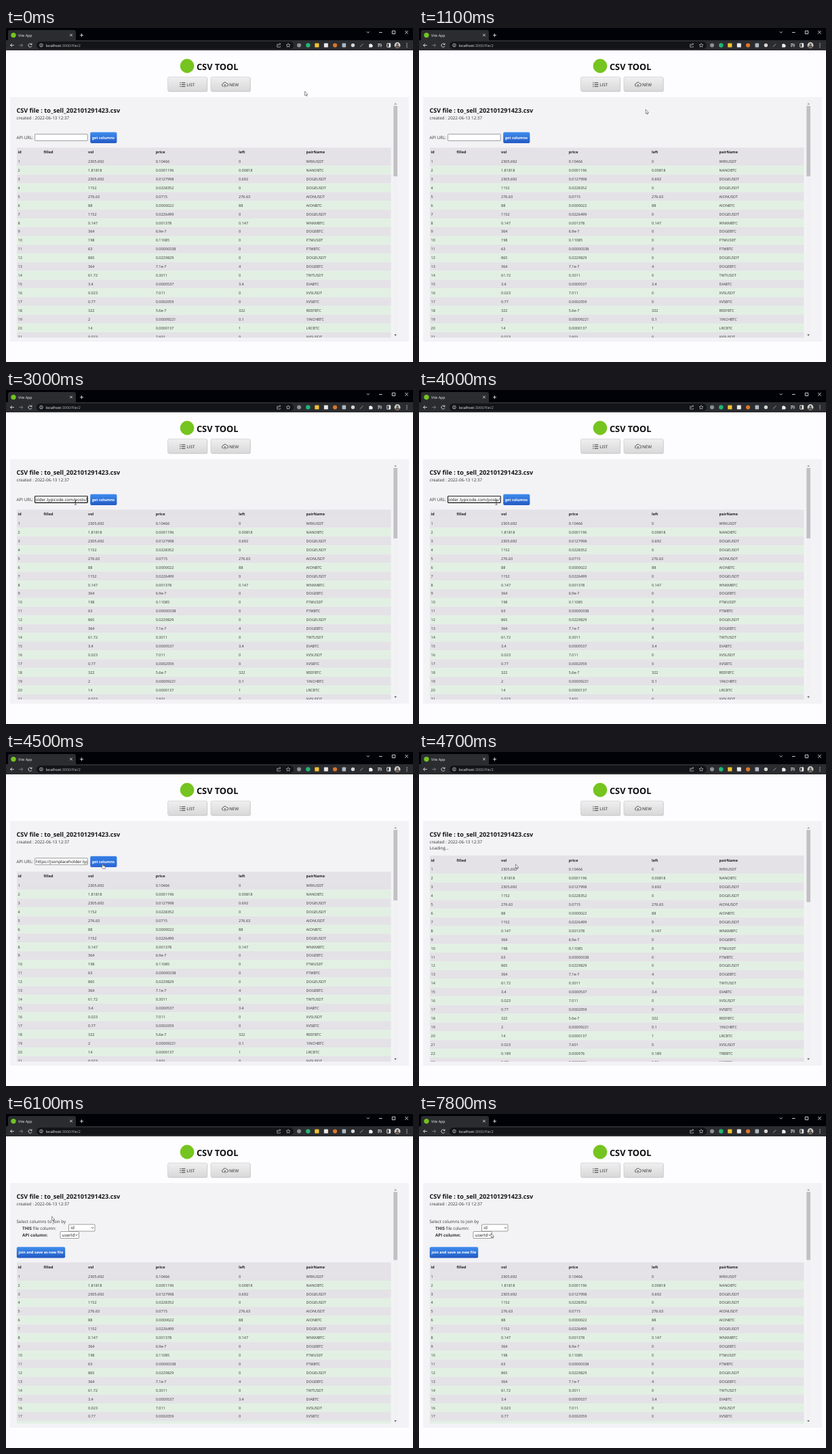
Animation of 600x493 px, one loop 8 s. Source, as an HTML page:

```html
<!DOCTYPE html>
<html lang="en">
<head>
<meta charset="utf-8">
<title>CSV tool</title>
<style>
  html, body { margin: 0; width: 100%; height: 100%; overflow: hidden; background: #fdfcfe; }
  svg { display: block; width: 600px; height: 493px; }
  text { font-family: "Open Sans", "Noto Sans", sans-serif; font-size: 6.3px; fill: #333; text-rendering: geometricPrecision; white-space: pre; }
  .b { font-weight: 700; }
  .cell { font-size: 5.5px; }
  .head { font-size: 5.5px; font-weight: 700; fill: #222; }
  .btn { font-size: 5.45px; font-weight: 700; fill: #fff; }
  .nav { font-size: 6.2px; font-weight: 600; fill: #555; }
  .line { fill: none; stroke: #dfe0e3; stroke-width: .9; }
  .dark { fill: none; stroke: #3c3c3c; stroke-width: 1; }
  .field { fill: #fff; stroke: #767676; stroke-width: .7; }
  .cursor { fill: #fff; stroke: #222; stroke-width: .5; }
</style>
</head>
<body>
<svg id="stage" viewBox="0 0 600 493" xmlns="http://www.w3.org/2000/svg"></svg>
<script>
const LOOP = 8000, STEP = 100, ROW = 12.925;
const URL_TEXT = 'https://jsonplaceholder.typicode.com/posts/';
const COLUMNS = { id: 17.5, filled: 55.5, vol: 121, price: 220.7, left: 343, pairName: 442.6 };
const ROWS = `2305.692 0.10466 0 WRXUSDT
1.81818 0.0001196 0.00818 NANOBTC
2305.692 0.0127998 0.692 DOGEUSDT
1152 0.0228352 0 DOGEUSDT
276.63 0.0715 276.63 AIONUSDT
88 0.0000022 88 AIONBTC
1152 0.0226499 0 DOGEUSDT
0.147 0.001378 0.147 WNXMBTC
364 6.9e-7 0 DOGEBTC
198 0.11085 0 FTMUSDT
63 0.00000338 0 FTMBTC
865 0.0229829 0 DOGEUSDT
364 7.1e-7 4 DOGEBTC
61.72 0.3011 0 TWTUSDT
3.4 0.0000537 3.4 DIABTC
0.023 7.011 0 XVSUSDT
0.77 0.0002059 0 XVSBTC
322 5.6e-7 322 REEFBTC
2 0.00009221 0.1 1INCHBTC
14 0.0000137 1 LRCBTC
0.023 7.601 0 XVSUSDT
0.189 0.000976 0.189 TRBBTC
0.77 0.0002031 0.01 XVSBTC`.split('\n').map(row => row.split(' '));

const rect = (x, y, w, h, fill, r = 0, extra = '') =>
  `<rect x="${x}" y="${y}" width="${w}" height="${h}" rx="${r}" fill="${fill}" ${extra}/>`;
const dot = (x, y, r, fill) => `<circle cx="${x}" cy="${y}" r="${r}" fill="${fill}"/>`;
const text = (x, y, value, cls = '', extra = '') => `<text x="${x}" y="${y}" class="${cls}" ${extra}>${value}</text>`;
const path = (d, cls = 'line', extra = '') => `<path d="${d}" class="${cls}" ${extra}/>`;
const gradient = (id, from, to) =>
  `<linearGradient id="${id}" x2="0" y2="1"><stop stop-color="${from}"/><stop offset="1" stop-color="${to}"/></linearGradient>`;
const clip = (id, x, y, w, h) => `<clipPath id="${id}">${rect(x, y, w, h, '#000')}</clipPath>`;

const defs = `<defs>
  ${gradient('grey', '#efefef', '#d8d8d8')}${gradient('blue', '#3f8dee', '#2259c4')}${gradient('hover', '#347fe6', '#2c66d4')}
  ${clip('scroll', 16, 107, 555, 350)}${clip('inside', 43, 156, 76.6, 11)}</defs>`;

function browser() {
  const bar = '#2b2c30';
  return rect(0, 0, 600, 33, '#000208') + rect(3, 3, 100, 17, bar, 3) + rect(0, 18, 600, 15, bar) +
    dot(11, 10.6, 3.7, '#73c322') +
    text(18, 12.6, 'Vite App', '', 'style="font-size:5.3px;fill:#f2f3f4"') +
    path('M94.2 8.7l3.6 3.6m0-3.6l-3.6 3.6M109 10.7h5m-2.5-2.5v5') +
    path('M531.8 5.3l1.9 1.9 1.9-1.9M550 6.5h4.6M569.3 4.2h4.4v4.4h-4.4zM588.2 4l4.6 4.6m0-4.6l-4.6 4.6') +
    rect(45, 20, 379, 11, '#131417', 5.5) +
    path('M11.8 25.5h-5.4m2.5-2.5l-2.5 2.5 2.5 2.5') +
    path('M19.3 25.5h5.4m-2.5-2.5l2.5 2.5-2.5 2.5', 'line', 'style="stroke:#7d7f84"') +
    path('M37.6 24a2.6 2.6 0 1 0 .4 2.5M38 22.5v2h-2') +
    `<circle cx="52" cy="25.5" r="2.4" class="line" style="stroke-width:.7"/>` + path('M52 25.2v1.6M52 23.9v.6') +
    text(58.5, 27.5, '<tspan fill="#fff">localhost</tspan>:3000/file/2', '', 'style="font-size:5.45px;fill:#b4b7bc"') +
    path('M401.5 24h-1.8v4.2h4.6v-1.5m-3-0.3c0-2 1-2.8 3.4-2.8m-1.5-1.3l1.6 1.3-1.6 1.4', 'line', 'style="stroke-width:.6"') +
    path('M416 22.6l.9 1.9 2.1.2-1.6 1.4.5 2.1-1.9-1.1-1.9 1.1.5-2.1-1.6-1.4 2.1-.2z', 'line', 'style="stroke-width:.6"') +
    dot(432, 25.5, 3, '#8d9095') + dot(445.3, 25.5, 3.2, '#20b576') +
    rect(455.2, 22.4, 6.2, 6.2, '#f1c232', .6) + rect(468.8, 22.5, 6, 6, '#e9e9e9', .6) +
    dot(485, 25.5, 3.1, '#df7625') + rect(495.5, 22.5, 5.6, 6, '#aeb8c4', .8) +
    dot(511.4, 25.5, 2.7, '#d5d5d5') + path('M522 27.8l4.3-4.4', 'line', 'style="stroke:#a8abb0"') +
    path('M535 24h1.5a1 1 0 0 1 2 0h1.4v1.4a1 1 0 0 1 0 2v1.1H535v-1.3a1 1 0 0 0 0-1.8z', '', 'fill="#eeeff0"') +
    path('M548 23.5h4.2M548 25.3h4.2M548 27.2h2.3M553.2 23.4v3.8h-1.4') +
    rect(561.7, 22.8, 5, 5.4, 'none', .4, 'stroke="#eee" stroke-width=".9"') + rect(564.4, 22.8, 2.3, 5.4, '#eee') +
    dot(577, 25.5, 4.4, '#cfd3d2') + dot(577, 24.2, 1.6, '#655850') +
    path('M573.8 28.4a3.2 2.8 0 0 1 6.4 0a4.4 4.4 0 0 1-6.4 0z', '', 'fill="#655850"') +
    [23, 25.5, 28].map(y => dot(591, y, .65, '#e4e5e8')).join('');
}

function navButton(x, label, labelX, icon) {
  return rect(x + .6, 72.9, 58, 21.3, '#cfcfd1', 2) +
    rect(x, 72.3, 58, 21.2, 'url(#grey)', 2, 'stroke="#c4c4c4" stroke-width=".6"') + icon + text(labelX, 85.8, label, 'nav');
}

function page() {
  const list = path('M258.7 80.9h5.6M258.7 83.6h5.6M258.7 86.3h5.6M256.2 80.9h1.3M256.2 83.6h1.3M256.2 86.3h1.3', 'dark');
  const cloud = path('M321 86h-.6a1.9 1.9 0 0 1-.2-3.8 2.6 2.6 0 0 1 4.9-.6 2.2 2.2 0 0 1 .3 4.4h-.8M322.8 87.3v-3.8m-1.3 1.3l1.3-1.3 1.3 1.3', 'dark', 'style="stroke-width:.8"');
  return rect(0, 33, 600, 460, '#fdfcfe') + dot(267, 56, 10.4, '#76c41f') +
    text(281, 62.1, 'CSV TOOL', 'b', 'style="font-size:12.75px;fill:#0c0c0c"') +
    navButton(238.5, 'LIST', 266.2, list) + navButton(302, 'NEW', 329, cloud) +
    rect(6, 102, 588, 361, '#f3f2f5') +
    text(15.4, 124.6, 'CSV file : to_sell_202101291423.csv', 'b', 'style="font-size:9.12px;fill:#141414"') +
    text(15.5, 134.9, 'created : 2022-06-13 12:37') +
    rect(571, 107, 6.3, 350, '#f1f0f2') + path('M572.3 112.9l1.8-2.2 1.8 2.2z', '', 'fill="#999"') +
    path('M572.3 452.2l1.8 2.2 1.8-2.2z', '', 'fill="#555"') + rect(571.3, 115, 5.7, 104, '#c1c0c3', 0, 'id="thumb"');
}

function table() {
  const xs = Object.values(COLUMNS);
  const head = rect(16, 0, 551.5, 14, '#e4e2e6') + Object.entries(COLUMNS).map(([name, x]) => text(x, 8.9, name, 'head')).join('');
  const body = ROWS.map((row, i) => {
    const y = 14 + i * ROW;
    return rect(16, y, 551.5, ROW, i % 2 ? '#e2f0e3' : '#e4e2e6') +
      [i + 1, '', ...row].map((value, c) => text(xs[c], y + 8.5, value, 'cell')).join('');
  }).join('');
  return `<g clip-path="url(#scroll)"><g id="table">${head}${body}</g></g>`;
}

function select(x, y, w, value) {
  return rect(x, y, w, 10, '#fff', 1, 'class="field"') + text(x + 2.8, y + 7.2, value, '', 'style="fill:#111"') +
    path(`M${x + w - 5.2} ${y + 4.2}l1.7 1.7 1.7-1.7`, 'dark', 'style="stroke-width:.9"');
}

const form = text(15.6, 164, 'API URL:') + rect(42.6, 156.7, 77.6, 9.7, '#fff', .6, 'id="field" class="field"') +
  `<g clip-path="url(#inside)">${text(44, 163.7, '', '', 'id="value" style="font-size:6.2px;fill:#111"')}</g>` +
  rect(44, 158, .6, 7, '#111', 0, 'id="caret"') + rect(124.2, 153.7, 39.2, 16.4, 'url(#blue)', 2, 'id="get"') +
  text(126.9, 163.8, 'get columns', 'btn');
const join = text(15.6, 160.7, 'Select columns to join by') +
  text(24, 170.6, '<tspan class="b">THIS</tspan> file column:') + text(24, 180.7, 'API column:', 'b') +
  select(92.5, 163, 38.5, 'id') + select(80, 173.5, 27.5, 'userId') +
  rect(15.8, 196.2, 71.4, 16.4, 'url(#blue)', 2) + text(18.6, 206.2, 'join and save as new file', 'btn');
const cursors = `<g id="cursor">
  ${path('M0 0v6.2l1.4-1.2.9 2.1 1-.4-.9-2h1.9z', 'cursor', 'id="arrow"')}
  ${path('M-1.5-3.3h1.1l.4.4.4-.4h1.1M-1.5 3.3h1.1l.4-.4.4.4h1.1M0-2.9v5.8', 'dark', 'id="beam" style="stroke-width:.8"')}
  ${path('M-.7 3.3V.5a.7.7 0 0 1 1.4 0v1.7l2.6.6q.8.3.6 1.2l-.6 2.6h-3.2l-2-2.5q.3-.9 1.2-.4z', 'cursor', 'id="hand"')}</g>`;

const $ = id => document.getElementById(id);
$('stage').innerHTML = defs + page() + table() + `<g id="form">${form}</g><g id="loading">${text(15.6, 144.3, 'Loading...')}</g><g id="join">${join}</g>` + browser() + cursors;

// Pointer path: time, x, y
const POINTER = [
  [0, 440.5, 93.5], [500, 431, 98], [900, 413.5, 107.5], [1300, 255, 133], [1600, 122, 161], [1800, 102.5, 166],
  [3800, 102.5, 166], [4000, 114, 166], [4300, 142.5, 165.7], [5800, 142.5, 165.7], [5900, 97, 157],
  [6000, 68.3, 150.8], [6100, 67.6, 151.2], [7400, 67.6, 151.2], [7600, 92, 166], [7800, 106.3, 176.2], [LOOP, 106.3, 176.2]
];
const VIEWS = {
  form: { top: 176.6, thumb: 104 },
  loading: { top: 152.8, thumb: 106.5 },
  join: { top: 219.2, thumb: 100.5 }
};

function pointerAt(t) {
  const i = Math.max(1, POINTER.findIndex(key => key[0] > t));
  const [t0, x0, y0] = POINTER[i - 1], [t1, x1, y1] = POINTER[i];
  const k = (t - t0) / (t1 - t0);
  return [x0 + (x1 - x0) * k, y0 + (y1 - y0) * k];
}

const show = (id, on) => $(id).setAttribute('display', on ? 'inline' : 'none');
const set = (id, attrs) => Object.entries(attrs).forEach(([name, value]) => $(id).setAttribute(name, value));

function render(t) {
  const view = t < 4600 ? 'form' : t < 6100 ? 'loading' : 'join';
  Object.keys(VIEWS).forEach(name => show(name, name === view));
  set('table', { transform: `translate(0 ${VIEWS[view].top})` });
  set('thumb', { height: VIEWS[view].thumb });

  const filled = t >= 2500, focused = t >= 2100 && t < 4400;
  $('value').textContent = filled ? URL_TEXT : '';
  set('value', { x: focused ? 119 : 44, 'text-anchor': focused ? 'end' : 'start' });
  $('field').style.cssText = focused ? 'stroke:#101010;stroke-width:1.1' : '';
  set('caret', { x: filled ? 119 : 44 });
  show('caret', focused && t < 3600);

  const [x, y] = pointerAt(t);
  const within = (left, right, top, bottom) => view === 'form' && x > left && x < right && y > top && y < bottom;
  const overButton = within(124, 164, 153, 171), overField = within(42, 121, 156, 167);
  set('get', { fill: overButton ? 'url(#hover)' : 'url(#blue)' });
  set('cursor', { transform: `translate(${x} ${y})` });
  show('hand', overButton);
  show('beam', overField);
  show('arrow', !overButton && !overField);
}

const start = performance.now();
function tick() {
  const t = (performance.now() - start) % LOOP;
  render(Math.floor(t / STEP) * STEP);
  requestAnimationFrame(tick);
}
tick();
</script>
</body>
</html>
```
